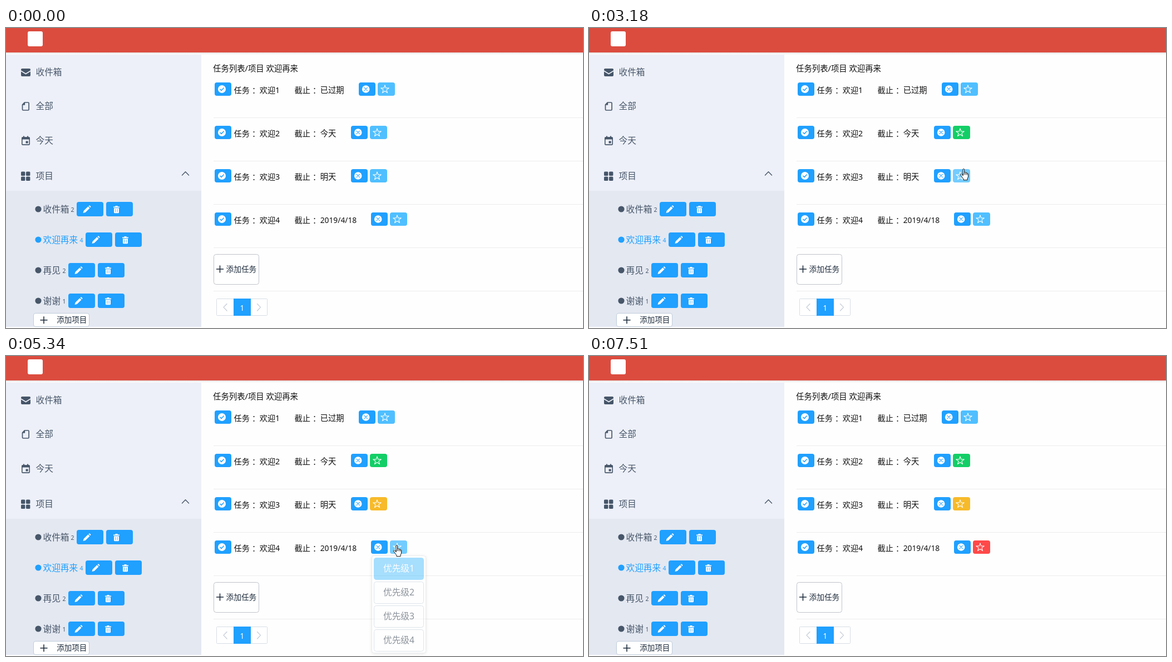
Animation of 1037x540 px, one loop 8.13 s. Source, as an HTML page:

```html
<!DOCTYPE html>
<html lang="zh-CN">
<head>
<meta charset="utf-8">
<title>任务列表</title>
<style>
  html, body { margin: 0; width: 100%; height: 100%; overflow: hidden; background: #fefefe; }
  svg { display: block; width: 1037px; height: 540px; }
  text { font-family: "Noto Sans", "Noto Sans CJK SC", "Noto Sans CJK", sans-serif; white-space: pre; }
  .line { fill: none; stroke-linecap: round; stroke-linejoin: round; }
  #popup { filter: drop-shadow(0 1px 2.5px rgba(0, 0, 0, .2)); }
</style>
</head>
<body>
<svg id="stage" viewBox="0 0 1037 540"></svg>
<script>
const LOOP = 8130, TICK = 77.5, FIRST_MOVE = 150;
const BLUE = '#20a0ff', INFO = '#50bfff', INFO_LIGHT = '#73ccff';
const GREEN = '#13ce66', YELLOW = '#f7ba2a', RED = '#ff4949';
const SLATE = '#475669', DARK = '#1f2d3d', BORDER = '#c0ccda';
const ACCENTS = [INFO, GREEN, YELLOW, RED];

const stage = document.getElementById('stage');

// --- drawing helpers; text is placed by its vertical centre ---
const rect = (x, y, w, h, fill, r = 0, extra = '') =>
  `<rect x="${x}" y="${y}" width="${w}" height="${h}" rx="${r}" fill="${fill}" ${extra}/>`;
const outlined = (x, y, w, h, stroke, r) =>
  rect(x + .5, y + .5, w - 1, h - 1, '#fff', r, `stroke="${stroke}"`);
const text = (x, cy, size, str, fill = '#111', extra = '') =>
  `<text x="${x}" y="${cy + size * .38}" font-size="${size}" fill="${fill}" ${extra}>${str}</text>`;
const line = (d, stroke, width = 1) =>
  `<path class="line" d="${d}" stroke="${stroke}" stroke-width="${width}"/>`;
const circle = (x, y, r, fill) => `<circle cx="${x}" cy="${y}" r="${r}" fill="${fill}"/>`;
const at = (x, y, body) => `<g transform="translate(${x} ${y})">${body}</g>`;
const plus = (x, y) => line(`M${x - 6} ${y}h12M${x} ${y - 6}v12`, DARK, 1.6);

const starPoints = Array.from({ length: 10 }, (_, i) => {
  const a = -Math.PI / 2 + i * Math.PI / 5, r = i % 2 ? 3 : 7.6;
  return `${(r * Math.cos(a)).toFixed(2)},${(r * Math.sin(a)).toFixed(2)}`;
}).join(' ');

const icons = {
  mail: `<path d="M0 3.2V2Q0 0 2 0H15Q17 0 17 2V3.2L8.5 8.4ZM0 5.2L8.5 10.4L17 5.2V12Q17 14 15 14H2Q0 14 0 12Z" fill="${SLATE}"/>`,
  file: line('M4.8 1H11.2Q12.6 1 12.6 2.4V13.6Q12.6 15 11.2 15H2.4Q1 15 1 13.6V5ZM1 5H4.8V1', SLATE, 1.7),
  calendar: rect(.8, 2.6, 13.4, 13, 'none', 1, `stroke="${SLATE}" stroke-width="1.6"`) +
    rect(.8, 2, 13.4, 4, SLATE) + rect(3, 0, 2, 3, SLATE) + rect(10, 0, 2, 3, SLATE) + rect(7.6, 9, 4, 4, SLATE),
  grid: [0, 9].flatMap(x => [0, 9].map(y => rect(x, y, 7.4, 7.4, SLATE, 1.5))).join(''),
  pencil: '<path d="M-7 6.5L-5.8 2.4L2 -5.2L5 -2.2L-2.8 5.4ZM3 -6.2L4 -7Q4.8 -7.4 5.6 -6.6L6.6 -5.6Q7.2 -4.8 6.6 -4L6 -3.2Z" fill="#fff"/>',
  trash: rect(-5.5, -5, 11, 1.8, '#fff', .5) + rect(-2, -6.5, 4, 2, '#fff', .5) +
    '<path d="M-4.5 -2.3H4.5V5.2Q4.5 6.8 3 6.8H-3Q-4.5 6.8 -4.5 5.2Z" fill="#fff"/>' +
    line('M-1.7 -.3V4.6M1.7 -.3V4.6', BLUE, .8),
  check: circle(0, 0, 7, '#fff') + line('M-3.2 .2L-.9 2.4L3.2 -2', BLUE, 1.5),
  close: circle(0, 0, 6.8, '#fff') + line('M-2.6 -2.6L2.6 2.6M2.6 -2.6L-2.6 2.6', BLUE, 1.1),
  star: `<polygon points="${starPoints}" fill="none" stroke="#fff" stroke-width="1.1" stroke-linejoin="round"/>`
};

// --- static page ---
const menu = [['mail', 27, 73, '收件箱', 79], ['file', 28.5, 133, '全部', 140.5],
  ['calendar', 28, 194.5, '今天', 202], ['grid', 27, 258.5, '项目', 266]];
const projects = [['收件箱', 2, 127], ['欢迎再来', 4, 143], ['再见', 2, 112], ['谢谢', 1, 112]];
const tasks = [['已过期', 634], ['今天', 620], ['明天', 620], ['2019/4/18', 656]];
const rowTop = i => 98 + 78 * i;
const starLeft = i => tasks[i][1] + 34;
const field = (x, cy, name) => text(x, cy, 14.2, `${name}<tspan dx="4">：</tspan>`);

const header = () =>
  rect(0, 44, 1037, 4, 'url(#shade)') + rect(0, 0, 1037, 44, '#db4c3f') + rect(39, 6, 27, 27, '#fff', 3);

const sidebar = () =>
  rect(0, 48, 351, 490, '#edf0f8') + rect(0, 293, 351, 245, '#e4e8f1') +
  menu.map(([icon, x, y, label, cy]) =>
    at(x, y, icons[icon]) + text(53.5, cy, 15.7, label, SLATE, 'font-weight="300"')).join('') +
  line('M316.5 265L322.5 258.7L328.5 265', SLATE, 1.4) +
  projects.map(([name, count, x], i) => {
    const cy = 326 + 55 * i, color = i === 1 ? BLUE : SLATE;
    return circle(58, cy, 5.6, color) +
      text(66.5, cy, 15.7, name, color, 'font-weight="300"') +
      text(x - 10.5, cy + 1, 10.5, count, color) +
      [['pencil', x], ['trash', x + 53]].map(([icon, left]) =>
        rect(left, cy - 13, 48, 26, BLUE, 4) + at(left + 18.5, cy + .5, icons[icon])).join('');
  }).join('') +
  outlined(49, 513, 101, 25, BORDER, 3.5) + plus(68, 525.7) + text(91.2, 525.3, 13.5, '添加项目', DARK);

const taskRow = ([due, x], i) => {
  const y = rowTop(i), cy = y + 13.8;
  return rect(375, y, 30, 24, BLUE, 4) + at(388, y + 12, icons.check) +
    field(409.5, cy, '任务') + text(455.7, cy, 14.2, `欢迎${i + 1}`) +
    field(518.5, cy, '截止') + text(564.7, cy, i === 3 ? 13.8 : 14.3, due) +
    rect(x, y, 30, 24, BLUE, 4) + at(x + 12.7, y + 12, icons.close) +
    rect(starLeft(i), y, 31, 24, INFO, 4, `id="star${i}"`) +
    at(starLeft(i) + 13, y + 12.5, icons.star);
};

const content = () =>
  text(372, 72.5, 14.4, '任务列表/项目 欢迎再来') + tasks.map(taskRow).join('') +
  [0, 1, 2, 3, 4].map(i => rect(373, 161 + 78 * i, 664, 1, '#ececec')).join('') +
  outlined(373, 407, 82, 55, '#bfc3ca', 4) + plus(384.5, 434) + text(395.5, 434, 13.7, '添加任务', DARK) +
  outlined(378, 487, 92, 31, '#d7dde4', 1) + rect(409, 487, 31, 31, BLUE) +
  text(424.3, 503.5, 13.5, '1', '#fff', 'text-anchor="middle"') +
  line('M397 496.5L391 502.7L397 509M451.5 496.5L457.5 502.7L451.5 509', '#c3cbd6', 1.2);

const option = n =>
  rect(4.5, 4.5 + 43 * n, 89, 39, '#fff', 4, `id="box${n}"`) +
  text(49, 22.7 + 43 * n, 15.7, `优先级${n + 1}`, DARK, `id="label${n}" text-anchor="middle"`);

const cursorShapes = `
  <g id="cursor" stroke="#111" stroke-width="1" fill="#fff" stroke-linejoin="round">
    <path id="arrow" d="M.5 .5V16L4 12.6L6.4 17.8L8.6 16.8L6.3 11.6H11.3Z"/>
    <g id="hand" transform="translate(-7 0)">
      <path d="M5 2Q5 .5 6.3 .5T7.6 2V7Q8.2 6.2 9.3 6.6Q10.2 6.9 10.2 7.8Q11 7.1 12 7.6Q12.7 8 12.7 8.8Q13.4 8.3 14 8.8Q14.6 9.2 14.6 10V14Q14.6 16 13 18V20.7H6V18.8Q4.5 17 3 14.5L.8 11.6Q.3 10.3 1.5 9.9Q2.6 9.7 3.6 11L5 12.6Z"/>
      <path d="M7.6 7V11M10.2 8V11.3M12.7 9V11.5M5 9V12.6" fill="none"/>
    </g>
  </g>`;

stage.innerHTML =
  `<defs><linearGradient id="shade" x2="0" y2="1"><stop stop-color="#e6e0e0"/><stop offset="1" stop-color="#fff"/></linearGradient></defs>` +
  header() + sidebar() + content() +
  `<g id="popup">${rect(.5, .5, 97, 175, '#fff', 4, 'stroke="#d9dde3"')}${[0, 1, 2, 3].map(option).join('')}</g>` +
  `<circle id="click" r="14" fill="#ff0" fill-opacity=".5"/>` + cursorShapes;

// --- motion ---
const path = [
  [150, 929, 530], [460, 800, 380], [770, 700, 250], [925, 684, 222], [1235, 667, 188], [1700, 667, 188],
  [2240, 682, 261], [2400, 682, 261], [2480, 682, 264], [3010, 682, 264], [3170, 674, 253], [3340, 667, 265],
  [3560, 667, 265], [3792, 685, 306], [4180, 677, 386], [4875, 677, 386], [5190, 703, 340], [5585, 703, 340],
  [5805, 721, 451], [6050, 727, 488], [6200, 726, 501], [7035, 726, 501], [7110, 735, 494], [7430, 944, 529]
];
const visits = [
  { row: 1, hover: 1080, show: 1400, open: 1520, click: 2320, fade: 2400, shut: 2480, paint: 2780 },
  { row: 2, hover: 3090, show: 3490, open: 3490, click: 4340, fade: 4500, shut: 4520, paint: 4880 },
  { row: 3, hover: 5110, show: 5340, open: 5420, click: 6340, fade: 6500, shut: 6570, paint: 6880 }
];
const between = (t, a, b) => t >= a && t < b;
const el = id => document.getElementById(id);
const set = (id, attrs) => Object.entries(attrs).forEach(([k, v]) => el(id).setAttribute(k, v));
const show = (id, on) => { el(id).style.display = on ? '' : 'none'; };

function cursorAt(time) {
  const t = FIRST_MOVE + Math.floor((time - FIRST_MOVE + 5) / TICK) * TICK;
  const i = path.findIndex(p => p[0] > t);
  if (i < 0) return path[path.length - 1].slice(1);
  if (i === 0) return path[0].slice(1);
  const [t0, x0, y0] = path[i - 1], [t1, x1, y1] = path[i], k = (t - t0) / (t1 - t0);
  return [x0 + (x1 - x0) * k, y0 + (y1 - y0) * k].map(Math.round);
}

function drawPopup(visit, t, x, y) {
  show('popup', visit);
  if (!visit) return;
  const left = tasks[visit.row][1] + 1, top = rowTop(visit.row) + 27;
  set('popup', {
    transform: `translate(${left} ${top})`,
    opacity: between(t, visit.open, visit.fade) ? 1 : .5
  });
  ACCENTS.forEach((accent, n) => {
    const over = between(y - top, 4 + 43 * n, 44 + 43 * n) && between(x - left, 4, 94);
    const primary = over ? INFO_LIGHT : INFO;
    set('box' + n, n ? { fill: '#fff', stroke: over ? accent : BORDER } : { fill: primary, stroke: primary });
    set('label' + n, { fill: n ? (over ? accent : DARK) : '#fff' });
  });
}

function render(t) {
  const [x, y] = cursorAt(t);
  visits.forEach(v => set('star' + v.row, {
    fill: t >= v.paint ? ACCENTS[v.row] : between(t, v.hover, v.click) ? INFO_LIGHT : INFO
  }));
  drawPopup(visits.find(v => between(t, v.show, v.shut)), t, x, y);

  const pointing = between(t, 1080, 6960) && !between(t, 4950, 5110);
  show('hand', pointing);
  show('arrow', !pointing);
  show('cursor', between(t, 150, 7510));
  show('click', visits.some(v => between(t, v.click, v.fade)));
  set('cursor', { transform: `translate(${x} ${y})` });
  set('click', { cx: x - 1, cy: y });
}

const start = performance.now();
function frame() {
  render((performance.now() - start) % LOOP);
  requestAnimationFrame(frame);
}
frame();
</script>
</body>
</html>
```
